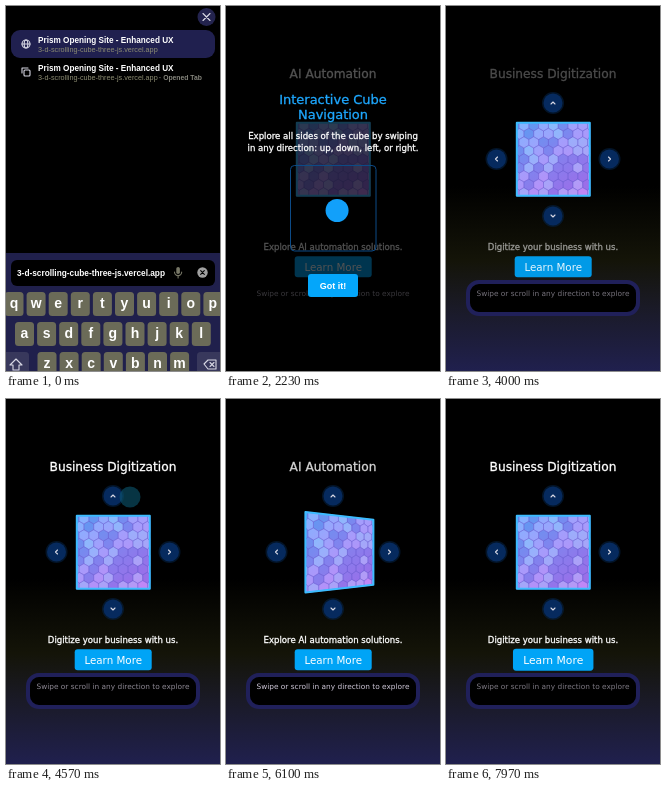
Animation, 214 px wide and 365 px high, one loop 8 s. Source, as an HTML page:

```html
<!DOCTYPE html>
<html lang="en">
<head>
<meta charset="utf-8">
<title>Cube navigation</title>
<style>
html, body { margin: 0; width: 100%; height: 100%; overflow: hidden; background: #000; }
svg { display: block; width: 100%; height: 100%; }
text { font-family: "DejaVu Sans", sans-serif; fill: #fff; text-anchor: middle; }
.bold { stroke: #fff; stroke-width: .3; }
.blue text { fill: #1ea8ff; stroke: #1ea8ff; stroke-width: .3; }
.ui text { font-family: "Liberation Sans", Arial, sans-serif; font-weight: bold; }
.ui .left { text-anchor: start; }
.ui .sub { font-weight: normal; font-size: 7.25px; fill: #8d8d72; }
.line { fill: none; stroke: #d8d8e4; stroke-width: 1.1; stroke-linecap: round; stroke-linejoin: round; }
</style>
</head>
<body>
<svg viewBox="0 0 214 365">
  <defs>
    <linearGradient id="floor" x1="0" y1="0" x2="0" y2="1">
      <stop offset="0" stop-color="#000"/>
      <stop offset=".4" stop-color="#141408"/>
      <stop offset=".65" stop-color="#1a1a26"/>
      <stop offset="1" stop-color="#20204e"/>
    </linearGradient>
    <linearGradient id="skin" x1="0" y1="0" x2=".7" y2="1">
      <stop offset="0" stop-color="#62bcff"/>
      <stop offset=".45" stop-color="#929cfa"/>
      <stop offset="1" stop-color="#b97cf2"/>
    </linearGradient>
  </defs>
  <rect width="214" height="365"/>

  <g id="page">
    <rect id="ground" y="180" width="214" height="185" fill="url(#floor)"/>
    <text id="title" class="bold" x="107" y="72" font-size="12.2"></text>
    <g id="cube"></g>
    <g id="arrows"></g>
    <circle id="touch" r="10.5" fill="#0c5670"/>
    <text id="desc" class="bold" x="107" y="243.5" font-size="8.55"></text>
    <g id="more">
      <rect id="moreBox" x="-38.5" y="-10.5" width="77" height="21" rx="3" fill="#00a4f6"/>
      <text id="moreText" y="4" font-size="10.3">Learn More</text>
    </g>
    <rect id="frame" x="22" y="276" width="170" height="32" rx="11" stroke="#20205a" stroke-width="4"/>
    <text id="hint" x="107" y="289.5" font-size="7.4" style="fill:#d2cbdc">Swipe or scroll in any direction to explore</text>
  </g>

  <g id="guide">
    <rect width="214" height="365" opacity=".68"/>
    <g class="blue" font-size="13">
      <text x="107" y="98">Interactive Cube</text>
      <text x="107" y="112.5">Navigation</text>
    </g>
    <g class="bold" font-size="8.58">
      <text x="107" y="133">Explore all sides of the cube by swiping</text>
      <text x="107" y="145">in any direction: up, down, left, or right.</text>
    </g>
    <rect x="64.5" y="159.5" width="85.5" height="85.5" rx="4" fill="none" stroke="#0c4a86"/>
    <circle id="dot" r="11.5" fill="#12a0fa"/>
    <rect x="82" y="268" width="50" height="23" rx="3" fill="#04a6fa"/>
    <g class="ui"><text x="107" y="283" font-size="9">Got it!</text></g>
  </g>

  <g id="search" class="ui">
    <rect width="214" height="365"/>
    <circle cx="200.5" cy="11" r="9" fill="#23234e"/>
    <path class="line" d="M197 7.5l7 7m0-7l-7 7"/>
    <rect x="5" y="24" width="204" height="28" rx="9" fill="#20204f"/>
    <g class="line">
      <circle cx="20" cy="38" r="4"/>
      <ellipse cx="20" cy="38" rx="1.8" ry="4"/>
      <path d="M16 38h8"/>
      <rect x="18" y="64" width="6" height="6" rx="1"/>
      <path d="M16 67v-5h6"/>
    </g>
    <g font-size="8.2">
      <text class="left" x="32" y="37">Prism Opening Site - Enhanced UX</text>
      <text class="left sub" x="32" y="45.5">3-d-scrolling-cube-three-js.vercel.app</text>
      <text class="left" x="32" y="65">Prism Opening Site - Enhanced UX</text>
      <text class="left sub" x="32" y="73.5">3-d-scrolling-cube-three-js.vercel.app</text>
      <text class="left" x="153" y="73.5" font-size="6.8" style="fill:#85857c">· Opened Tab</text>
    </g>
  </g>
  <g id="keys" class="ui">
    <rect y="247" width="214" height="130" fill="#20204c"/>
    <rect x="5" y="254" width="204" height="26" rx="6"/>
    <text class="left" x="11" y="269.5" font-size="8.3">3-d-scrolling-cube-three-js.vercel.app</text>
    <rect x="170.3" y="261" width="3.6" height="7" rx="1.8" fill="#777766"/>
    <path class="line" d="M168.5 266a3.6 3.6 0 0 0 7.2 0m-3.6 3.6v2.4" style="stroke:#777766"/>
    <circle cx="196.5" cy="266.5" r="5.2" fill="#a0a0a0"/>
    <path class="line" d="M194.7 264.7l3.6 3.6m0-3.6l-3.6 3.6" style="stroke:#000"/>
  </g>
</svg>
<script>
const $ = id => document.getElementById(id);
const LOOP = 8000;
const AI = ['AI Automation', 'Explore AI automation solutions.'];
const BIZ = ['Business Digitization', 'Digitize your business with us.'];

function add(parent, tag, attrs, text) {
  const el = document.createElementNS('http://www.w3.org/2000/svg', tag);
  for (const k in attrs) el.setAttribute(k, attrs[k]);
  if (text) el.textContent = text;
  return parent.appendChild(el);
}
const set = (el, k, v) => el.setAttribute(k, v);
const clamp = (v, a, b) => Math.max(a, Math.min(b, v));
const ramp = (t, a, b) => clamp((t - a) / (b - a), 0, 1);
const ease = p => p * p * (3 - 2 * p);

// Linear keyframes given as time, value pairs.
function track(t, ...k) {
  let v = k[1];
  for (let i = 2; i < k.length; i += 2)
    v += (k[i + 1] - k[i - 1]) * ramp(t, k[i - 2], k[i]);
  return v;
}

// Keyboard
function keyRow(letters, x, y) {
  [...letters].forEach((c, i) => {
    const cx = x + i * 22.1;
    add($('keys'), 'rect', { x: cx - 9.5, y, width: 19, height: 24, rx: 3.5, fill: '#6b6b58' });
    add($('keys'), 'text', { x: cx, y: y + 15.5, 'font-size': 14 }, c);
  });
}
keyRow('qwertyuiop', 8, 286);
keyRow('asdfghjkl', 18.5, 316);
keyRow('zxcvbnm', 41, 346);
for (const x of [-4, 191]) add($('keys'), 'rect', { x, y: 346, width: 27, height: 24, rx: 3.5, fill: '#38385c' });
add($('keys'), 'path', { class: 'line', d: 'M10 353l-6 6h3v5h6v-5h3zM198 358l4-4h8v9h-8zM204 356.5l4 4m0-4l-4 4' });

// Arrow buttons
[[107, 97, 0], [163.5, 153, 90], [107, 210, 180], [50.5, 153, 270]].forEach(([x, y, turn]) => {
  const g = add($('arrows'), 'g', { transform: `translate(${x} ${y}) rotate(${turn})` });
  add(g, 'circle', { r: 11, fill: '#062850', opacity: .5 });
  add(g, 'circle', { r: 9.5, fill: '#062a5e' });
  add(g, 'path', { class: 'line', d: 'M-2 1l2-2l2 2' });
});

// Cube: each face maps (u, v) in -1..1 to a point in space.
const FACES = [
  (u, v) => [u, v, 1], (u, v) => [-u, v, -1],
  (u, v) => [u, -1, v], (u, v) => [u, 1, -v],
  (u, v) => [1, v, -u], (u, v) => [-1, v, u]
];
const SHADES = ['#a8e0ff', '#4a4cd0', '#cfa0ff'];
let seed = 7;
const rand = () => (seed = seed * 16807 % 2147483647) / 2147483647;
const R = .155, W = R * Math.sqrt(3);
const hexes = [];
for (let row = -5; row <= 5; row++)
  for (let col = -4; col <= 4; col++)
    hexes.push({ x: (col + (row & 1) / 2) * W, y: row * R * 1.5, shade: Math.floor(rand() * 3) });

const faces = FACES.map(at => {
  const g = add($('cube'), 'g', {});
  return {
    at, g,
    base: add(g, 'path', { fill: 'url(#skin)' }),
    cells: SHADES.map(fill => add(g, 'path', {
      fill, 'fill-opacity': .28, stroke: '#6a5cd0', 'stroke-opacity': .6, 'stroke-width': .6
    })),
    edge: add(g, 'path', { fill: 'none', stroke: '#3cbcff', 'stroke-width': 2, 'stroke-linejoin': 'round' })
  };
});

function drawCube(pitch, yaw) {
  const H = 36.5, K = 3.5;
  const cp = Math.cos(pitch), sp = Math.sin(pitch), cy = Math.cos(yaw), sy = Math.sin(yaw);
  const project = ([x, y, z]) => {
    const x1 = x * cy + z * sy, z1 = z * cy - x * sy;
    const y2 = y * cp + z1 * sp, z2 = z1 * cp - y * sp;
    const s = H * (K - 1) / (K - z2);
    return [107.3 + x1 * s, 153.3 + y2 * s];
  };
  const poly = pts => 'M' + pts.map(p => p[0].toFixed(1) + ' ' + p[1].toFixed(1)).join('L') + 'Z';
  for (const f of faces) {
    const q = [[-1, -1], [1, -1], [1, 1], [-1, 1]].map(p => project(f.at(...p)));
    const area = (q[1][0] - q[0][0]) * (q[2][1] - q[0][1]) - (q[1][1] - q[0][1]) * (q[2][0] - q[0][0]);
    set(f.g, 'display', area > 1 ? 'inline' : 'none');
    if (area <= 1) continue;
    set(f.base, 'd', poly(q));
    set(f.edge, 'd', poly(q));
    const d = ['', '', ''];
    for (const h of hexes) {
      const pts = [];
      for (let i = 0; i < 6; i++) {
        const a = Math.PI / 6 + i * Math.PI / 3;
        pts.push(project(f.at(clamp(h.x + R * Math.cos(a), -1, 1), clamp(h.y + R * Math.sin(a), -1, 1))));
      }
      d[h.shade] += poly(pts);
    }
    f.cells.forEach((c, i) => set(c, 'd', d[i]));
  }
}

const copyFade = t => track(t, 3660, 1, 3860, 0, 3920, 0, 4200, 1, 5270, 1, 5550, 0,
  5850, 0, 6150, 1, 6600, 1, 6820, 0, 7450, 0, 7750, 1);

function render(t) {
  // Browser search sheet
  set($('search'), 'opacity', 1 - ramp(t, 350, 700));
  set($('keys'), 'transform', `translate(0 ${125 * ease(ramp(t, 150, 600))})`);

  // Swipe guide hides the floor, arrows and hint frame.
  const guide = track(t, 1350, 0, 1700, 1, 2530, 1, 2850, 0);
  set($('guide'), 'opacity', guide);
  for (const id of ['ground', 'arrows', 'frame']) set($(id), 'opacity', 1 - guide);
  const swing = (t - 2230) / 2000 * 2 * Math.PI;
  set($('dot'), 'transform', `translate(${111 + 20 * Math.sin(swing)} 204.5)`);

  // Page
  set($('page'), 'opacity', ramp(t, 860, 1150));
  const copy = t < 3890 || (t > 5700 && t < 6850) ? AI : BIZ;
  $('title').textContent = copy[0];
  $('desc').textContent = copy[1];
  set($('title'), 'opacity', copyFade(t));
  set($('desc'), 'opacity', copyFade(t + 80));
  const more = copyFade(t + 170);
  set($('moreBox'), 'opacity', .38 + .62 * more);
  set($('moreText'), 'opacity', more);
  const grow = 1 + .045 * ease(ramp(t, 7750, 7930));
  set($('more'), 'transform', `translate(107.2 260.7) scale(${grow})`);
  set($('hint'), 'opacity', .76 + .22 * Math.cos((t - 6100) / 4800 * 2 * Math.PI));

  // All faces look alike, so a finished quarter turn equals no turn.
  const turn = (a, b) => t < b ? Math.PI / 2 * ease(ramp(t, a, b)) : 0;
  drawCube(turn(3186, 3986), turn(6900, 7550) - turn(5550, 6300));

  const late = t > 4000;
  set($('touch'), 'transform', `translate(${late ? 124 : 107} ${late ? 98 : 97})`);
  set($('touch'), 'opacity', .6 * track(t, 3050, 0, 3150, 1, 3450, 1, 3600, 0, 4420, 0, 4520, 1, 4600, 1, 4750, 0));
}

function loop() {
  render(performance.now() % LOOP);
  requestAnimationFrame(loop);
}
loop();
</script>
</body>
</html>
```
